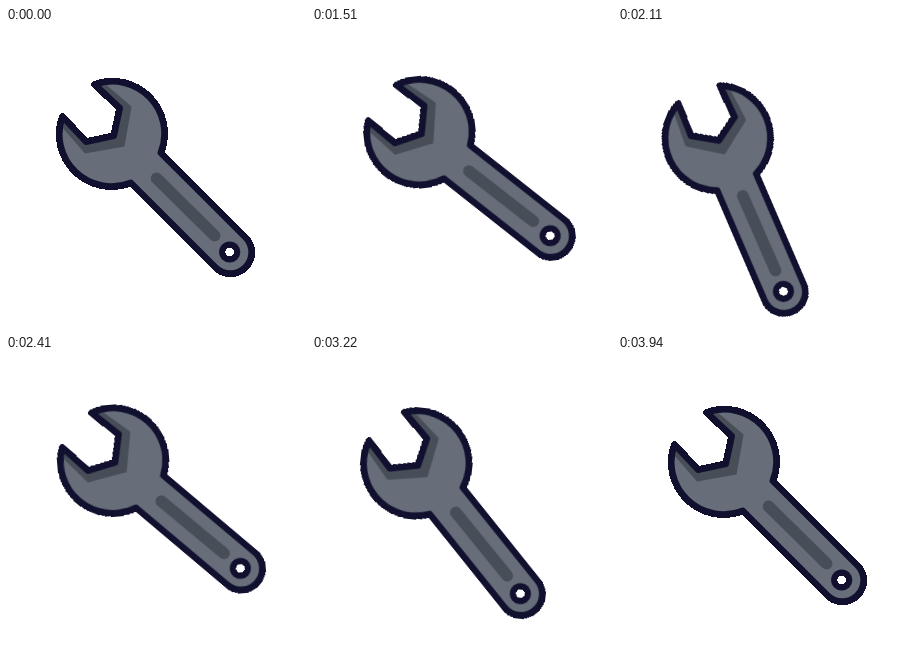
These frames come from a looping animation (300x300 px, 4000 ms). An HTML page:

```html
<!DOCTYPE html>
<html lang="en">
<head>
<meta charset="utf-8">
<title>Turning wrench</title>
<style>
  html, body {
    margin: 0;
    width: 100%;
    height: 100%;
    overflow: hidden;
    background: #fff;
  }
  svg { display: block; width: 100%; height: 100%; }

  .wrench {
    transform-origin: 92px 92px; /* middle of the jaw */
    animation: turn 4s infinite;
  }
  .body { fill: #676e79; }
  .shade { fill: #474e58; }
  .groove { stroke: #474e58; stroke-width: 11.8; stroke-linecap: round; }
  .line, .rim { fill: none; stroke: #11102f; stroke-linejoin: round; }
  .line { stroke-width: 6; }
  .rim { stroke-width: 7.4; shape-rendering: crispEdges; }
  .ring { fill: #11102f; }
  .hole { fill: #fff; shape-rendering: crispEdges; }

  @keyframes turn {
    0%     { transform: rotate(0deg); }
    25%    { transform: rotate(0deg); animation-timing-function: cubic-bezier(.42, 0, .67, 1); }
    29.5%  { transform: rotate(22deg); animation-timing-function: cubic-bezier(.33, 0, .2, 1); }
    43.25% { transform: rotate(-10.5deg); animation-timing-function: cubic-bezier(.5, 0, .6, 1); }
    52%    { transform: rotate(22deg); animation-timing-function: cubic-bezier(.33, 0, .2, 1); }
    67.5%  { transform: rotate(-10.5deg); animation-timing-function: cubic-bezier(.5, 0, .6, 1); }
    76.25% { transform: rotate(22deg); animation-timing-function: cubic-bezier(.33, 0, .67, 1); }
    85%    { transform: rotate(-10.5deg); animation-timing-function: cubic-bezier(.33, 0, .4, 1); }
    98.25% { transform: rotate(0deg); }
    100%   { transform: rotate(0deg); }
  }
</style>
</head>
<body>
<svg viewBox="0 0 300 300">
  <defs>
    <path id="shape" d="M89 56.5 A52 52 0 0 1 154.5 124.9 L239.2 209.5
      A21 21 0 0 1 209.5 239.2 L124.9 154.5 A52 52 0 0 1 56.5 89
      L80 114 L108 108 L114 80 Z"/>
  </defs>
  <g class="wrench">
    <!-- hard outer rim below, smooth line on top -->
    <use href="#shape" class="rim"/>
    <use href="#shape" class="body"/>
    <path class="shade" d="M89 56.5 L98 55 L125.6 78.6 L118.5 118.6 L79 125.6 L55 98 L56.5 89 L80 114 L108 108 L114 80 Z"/>
    <path class="groove" d="M150.6 150.4 L208.6 207.6"/>
    <use href="#shape" class="line"/>
    <circle class="ring" cx="223.7" cy="224" r="10.6"/>
    <circle class="hole" cx="223.7" cy="224" r="4.4"/>
  </g>
</svg>
</body>
</html>
```
